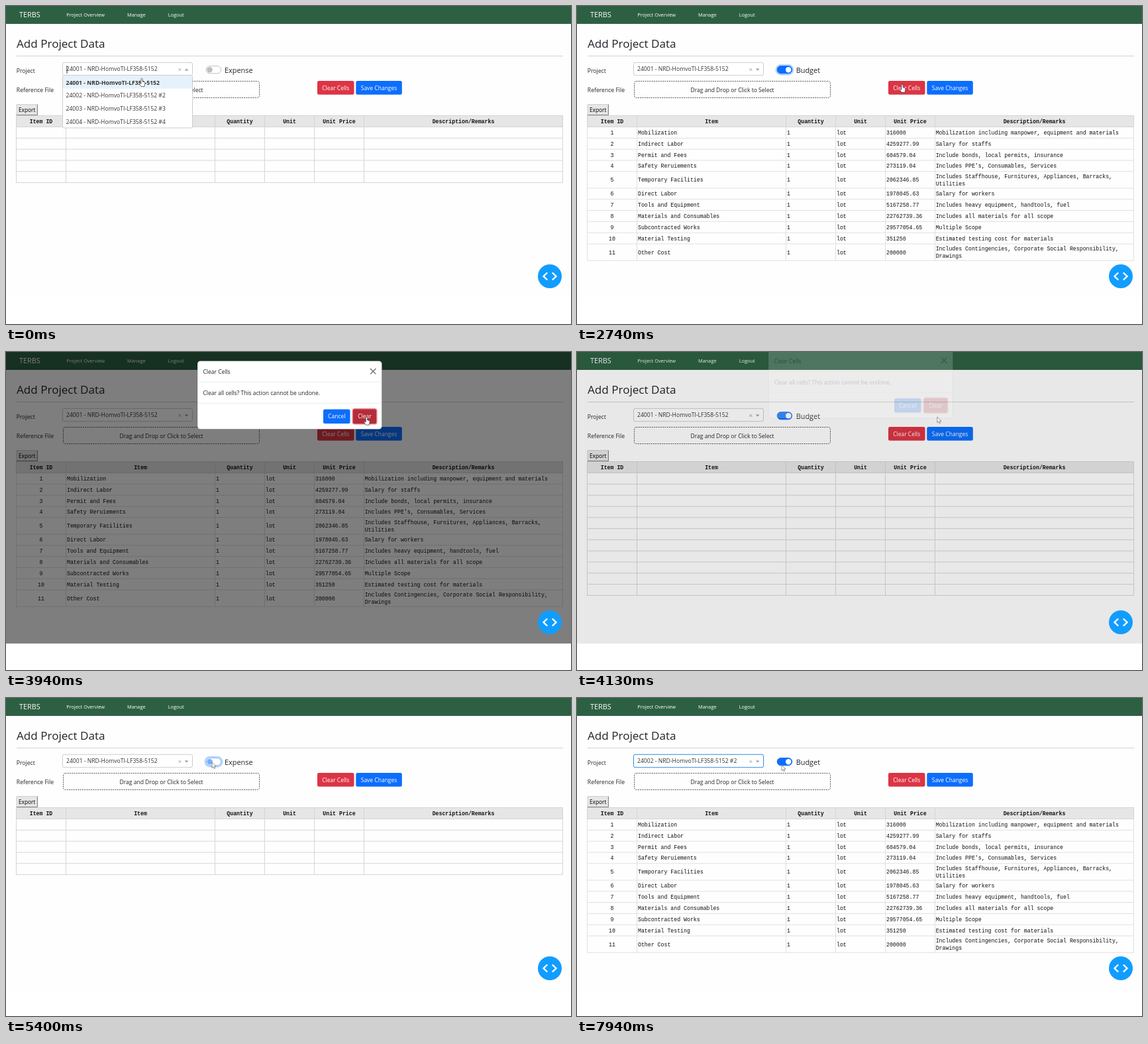
Recreate the animation shown at these times as an HTML page. Size 853 by 480 pixels, loop 8 s.

```html
<!DOCTYPE html>
<html lang="en">
<head>
<meta charset="utf-8">
<title>Add Project Data</title>
<style>
html, body { margin: 0; width: 100%; height: 100%; overflow: hidden; background: #fff; }
svg { display: block; width: 853px; height: 480px; }
text { font-family: "Open Sans", "Noto Sans", sans-serif; white-space: pre; }
.mono text { font-family: "Liberation Mono", "DejaVu Sans Mono", monospace; }
.crisp { shape-rendering: crispEdges; }
</style>
</head>
<body>
<svg id="stage" viewBox="0 0 853 480"></svg>
<script>
const LOOP = 8000;
const INK = '#212529', BLUE = '#0d6efd', RED = '#dc3545';
const CODE = 'NRD-HomvoTI-LF358-5152';
const projects = ['24001 - ' + CODE, ...[2, 3, 4].map(n => `2400${n} - ${CODE} #${n}`)];
const columns = [15.5, 90.5, 315.5, 390.5, 465.5, 540.5, 840.5];
const heads = ['Item ID', 'Item', 'Quantity', 'Unit', 'Unit Price', 'Description/Remarks'];
const items = [
  'Mobilization|316000|Mobilization including manpower, equipment and materials',
  'Indirect Labor|4259277.99|Salary for staffs',
  'Permit and Fees|604579.04|Include bonds, local permits, insurance',
  "Safety Reruiements|273119.04|Includes PPE's, Consumables, Services",
  'Temporary Facilities|2062346.85|Includes Staffhouse, Furnitures, Appliances, Barracks,|Utilities',
  'Direct Labor|1978045.63|Salary for workers',
  'Tools and Equipment|5167258.77|Includes heavy equipment, handtools, fuel',
  'Materials and Consumables|22762739.36|Includes all materials for all scope',
  'Subcontracted Works|29577054.65|Multiple Scope',
  'Material Testing|351250|Estimated testing cost for materials',
  'Other Cost|200000|Includes Contingencies, Corporate Social Responsibility,|Drawings'
].map(s => s.split('|'));

const text = (s, x, y, size = 8.5, fill = INK, more = '') =>
  `<text x="${x}" y="${y}" font-size="${size}" fill="${fill}" ${more}>${s}</text>`;
const mid = 'text-anchor="middle"';
const rect = (x, y, w, h, fill, more = '') =>
  `<rect x="${x}" y="${y}" width="${w}" height="${h}" fill="${fill}" ${more}/>`;
const path = (d, stroke, more = '') => `<path d="${d}" fill="none" stroke="${stroke}" ${more}/>`;
const group = (id, body, more = '') => `<g id="${id}" ${more}>${body}</g>`;
const button = (s, x, y, w, h, fill, more = '') =>
  rect(x, y, w, h, fill, 'rx="2.5" ' + more) + text(s, x + w / 2, y + h / 2 + 3.2, 8.5, '#fff', mid);

function table(id, rows, line) {
  let y = 182.6, out = '', lines = '';
  rows.forEach((row, i) => {
    const h = row[3] ? 25.2 : 16.8, base = y + h / 2 + 2.9;
    const cell = (s, x, at = base) => { out += text(s, x, at, 8.22, '#111'); };
    if (row.length) {
      out += text(i + 1, 53, base, 8.22, '#111', mid);
      cell(row[0], 92);
      cell(1, 317);
      cell('lot', 392);
      cell(row[1], 467);
      if (row[3]) { cell(row[2], 541.7, base - 5.5); cell(row[3], 541.7, base + 5.5); }
      else cell(row[2], 541.7);
    }
    y += h;
    lines += `M15 ${y}H841`;
  });
  for (const x of columns) lines += `M${x} 182V${y + .5}`;
  return group(id, path(lines, line) + out, 'class="mono"');
}

const header = rect(15.5, 165.5, 825, 17, '#e6e6e6', 'stroke="#d4d4d4"') +
  path(columns.slice(1, 6).map(x => `M${x} 165V183`).join(''), '#d4d4d4') +
  heads.map((s, i) => text(s, (columns[i] + columns[i + 1]) / 2, 176.9, 8.22, '#111', mid + ' font-weight="700"')).join('');

const menu = rect(85.5, 104.5, 196, 79.5, '#fff', 'stroke="#ccc" rx="2"') +
  projects.map((s, i) => rect(86, 105 + i * 19.7, 195, 19.7, '#e6f2fb', `id="hot${i}"`) +
    text(s, 90.5, 118.7 + i * 19.7, 8.6, '#333', `id="opt${i}"`)).join('');

const dialog = rect(289, 13.5, 278.5, 103, '#fff', 'rx="4.5" stroke="#000" stroke-opacity=".2"') +
  path('M289 45.3H567.5M289 77.5H567.5', '#e3e6e9', 'stroke-width=".8"') +
  text('Clear Cells', 297.5, 33) +
  path('M550 25l8.4 8.4m0-8.4l-8.4 8.4', '#666', 'stroke-width="1.3"') +
  text('Clear all cells? This action cannot be undone.', 297.5, 65) +
  button('Cancel', 479, 86.5, 40.5, 21.5, BLUE) +
  rect(522.5, 85, 38, 24.5, '#e8808b', 'rx="4" id="press"') +
  button('Clear', 524, 86.5, 35, 21.5, '#b52b39');

const hand = 'M-1.2 .6A1.2 1.2 0 0 1 1.2 .6V4L4 4.8Q5 5.2 4.8 6.6L4 11.5H-.8L-3.8 7.4Q-4.2 6-2.8 6L-1.2 7.4Z';
const arrow = 'M0 0V8.6L2 6.8 3.3 9.8 4.7 9.2 3.4 6.3H6Z';
const beam = 'M-2-4.5H2M0-4.5V4.5M-2 4.5H2';
const pointer = 'fill="#fff" stroke-width=".7" stroke-linejoin="round"';

const stage = document.getElementById('stage');
stage.innerHTML =
  rect(0, 0, 853, 440, '#fefefe') +
  rect(0, 0, 853, 27, '#2d6043') +
  text('TERBS', 20, 17, 10.8, '#fff') +
  text('Project Overview', 91.3, 15.6, 7.4, '#fff') +
  text('Manage', 183, 15.6, 7.4, '#fff') +
  text('Logout', 244.7, 15.6, 7.4, '#fff') +
  text('Add Project Data', 16, 63, 17.1) +
  path('M16 75.5H841', '#d2d2d2', 'class="crisp"') +
  text('Project', 15.8, 100.5, 8.65) + text('Reference File', 15.8, 130, 8.65) +
  rect(86.5, 113.5, 296, 25, 'none', 'rx="3" stroke="#444" stroke-width=".9" stroke-dasharray="2 1.3"') +
  text('Drag and Drop or Click to Select', 234.5, 130.2, 8.55, INK, mid) +
  rect(84, 84, 199, 22, '#007eff', 'rx="4" opacity=".1" id="glow"') +
  rect(85.5, 85.3, 196, 19.4, '#fff', 'rx="2.5" id="box"') +
  text('', 91, 98.3, 8.6, '#333', 'id="value"') +
  path('M92 90V102', '#222', 'id="caret" stroke-width=".9"') +
  path('M260.5 94.2l3.6 3.6m0-3.6l-3.6 3.6', '#999', 'stroke-width=".9"') +
  '<path id="tri" fill="#999"/>' +
  rect(299.5, 87.7, 28, 17, BLUE, 'rx="8.5" opacity=".28" id="ring"') +
  rect(302.2, 90.6, 22.5, 11.2, '#fff', 'rx="5.6" id="track"') +
  '<circle id="knob" cy="96.2" r="4.2"/>' +
  text('', 330, 101.2, 10.9, INK, 'id="mode"') +
  button('Clear Cells', 470, 113, 55.5, 20.7, RED) +
  button('Save Changes', 528.3, 113, 69.5, 20.7, BLUE) +
  rect(16, 148.5, 31.5, 16.5, '#e6e6e6') +
  path('M16 165V148.5H47', '#cfcfcf') + path('M16 164.6H47.4V148.5', '#777') +
  text('Export', 31.7, 160.2, 8.3, '#000', mid) +
  group('head', header, 'class="mono"') +
  table('short', Array(5).fill([]), '#d6d6d6') +
  table('full', items, '#e0e0e0') +
  table('blank', Array(11).fill([]), '#d6d6d6') +
  group('menu', menu) +
  rect(0, 0, 853, 440, '#000', 'id="shade"') +
  group('modal', dialog) +
  '<circle cx="821" cy="408" r="18" fill="#119dff"/>' +
  path('M817.2 402.5L811.5 408 817.2 413.5M824.8 402.5L830.5 408 824.8 413.5', '#fff', 'stroke-width="2.4"') +
  group('cursor', `<path id="hand" d="${hand}" stroke="#333" ${pointer}/>` +
    `<path id="arrow" d="${arrow}" stroke="#666" ${pointer}/>` + path(beam, '#222', 'id="beam"'));

const el = {};
stage.querySelectorAll('[id]').forEach(e => el[e.id] = e);
const set = (id, attrs) => { for (const k in attrs) el[id].setAttribute(k, attrs[k]); };
const show = (id, on) => set(id, { display: on ? 'inline' : 'none' });
const clamp = p => Math.min(1, Math.max(0, p));
const between = (t, a, b) => t >= a && t < b;

// time, x, y of the tip, shape until the next stop
const stops = [
  [0, 205, 110, 'hand'], [330, 205, 110, 'beam'], [650, 205, 104, 'beam'], [950, 285, 98, 'arrow'],
  [1150, 311, 97, 'arrow'], [1900, 311, 97, 'arrow'], [2500, 480, 118, 'hand'], [2700, 491, 119, 'hand'],
  [2950, 491, 119, 'arrow'], [3250, 491, 119, 'arrow'], [3600, 540, 100, 'hand'], [3750, 545, 100, 'hand'],
  [4070, 544, 98, 'arrow'], [4400, 543, 98, 'arrow'], [5100, 311, 97, 'arrow'], [5950, 311, 97, 'arrow'],
  [6230, 260, 98, 'beam'], [6420, 218, 98, 'beam'], [6750, 218, 98, 'beam'], [6850, 216, 108, 'hand'],
  [7050, 206, 131, 'hand'], [7330, 206, 131, 'arrow'], [7450, 206, 131, 'arrow'], [7850, 309, 101, 'arrow'],
  [8000, 309, 101, 'arrow']
];

function moveCursor(t) {
  const i = stops.findIndex((s, n) => n + 1 === stops.length - 1 || t < stops[n + 1][0]);
  const [t0, x0, y0, shape] = stops[i], [t1, x1, y1] = stops[i + 1];
  const p = clamp((t - t0) / (t1 - t0)), e = p * p * (3 - 2 * p);
  set('cursor', { transform: `translate(${x0 + (x1 - x0) * e} ${y0 + (y1 - y0) * e})` });
  for (const s of ['hand', 'arrow', 'beam']) show(s, s === shape);
}

function render(t) {
  const open = t < 330 || between(t, 6700, 7330);
  const picked = !open && (t < 1400 || t >= 7330);
  show('menu', open);
  show('caret', open || picked && t < 900);
  show('glow', picked);
  set('box', { stroke: picked ? '#3d95e8' : '#ccc' });
  set('tri', { d: open ? 'M269.8 97.6h5.6l-2.8-3z' : 'M269.8 94.6h5.6l-2.8 3z' });
  el.value.textContent = projects[t < 7330 ? 0 : 1];
  const hot = t > 6930 ? 1 : 0;
  projects.forEach((_, i) => {
    show('hot' + i, i === hot);
    set('opt' + i, { 'font-weight': i === hot ? 700 : 400 });
  });

  const on = between(t, 1400, 5250) || t >= 5800;
  const focus = between(t, 1400, 2860) || between(t, 5250, 6700);
  const slide = clamp((t - 1400) / 150) - clamp((t - 5250) / 150) + clamp((t - 5800) / 150);
  show('ring', focus);
  set('track', { fill: on ? BLUE : '#fff', stroke: on ? BLUE : focus ? '#86b7fe' : '#bfbfbf' });
  set('knob', { cx: 307.6 + 11.6 * slide, fill: on ? '#fff' : focus ? '#78aefb' : '#bfbfbf' });
  set('mode', { x: on ? 330.7 : 330 });
  el.mode.textContent = on ? 'Budget' : 'Expense';

  const full = between(t, 1600, 4070) || t >= 5980;
  const blank = between(t, 4070, 5320);
  show('full', full);
  show('blank', blank);
  show('short', !full && !blank);

  const fade = clamp((t - 2880) / 150) * (1 - clamp((t - 4060) / 86));
  const lift = (1 - clamp((t - 2880) / 300)) ** 2 + clamp((t - 4060) / 143);
  show('press', t >= 3860);
  set('shade', { opacity: fade / 2 });
  set('modal', { opacity: fade, transform: `translate(0 ${-33 * lift})` });
  moveCursor(t);
}

const start = performance.now();
function tick() {
  render((performance.now() - start) % LOOP);
  requestAnimationFrame(tick);
}
tick();
</script>
</body>
</html>
```
